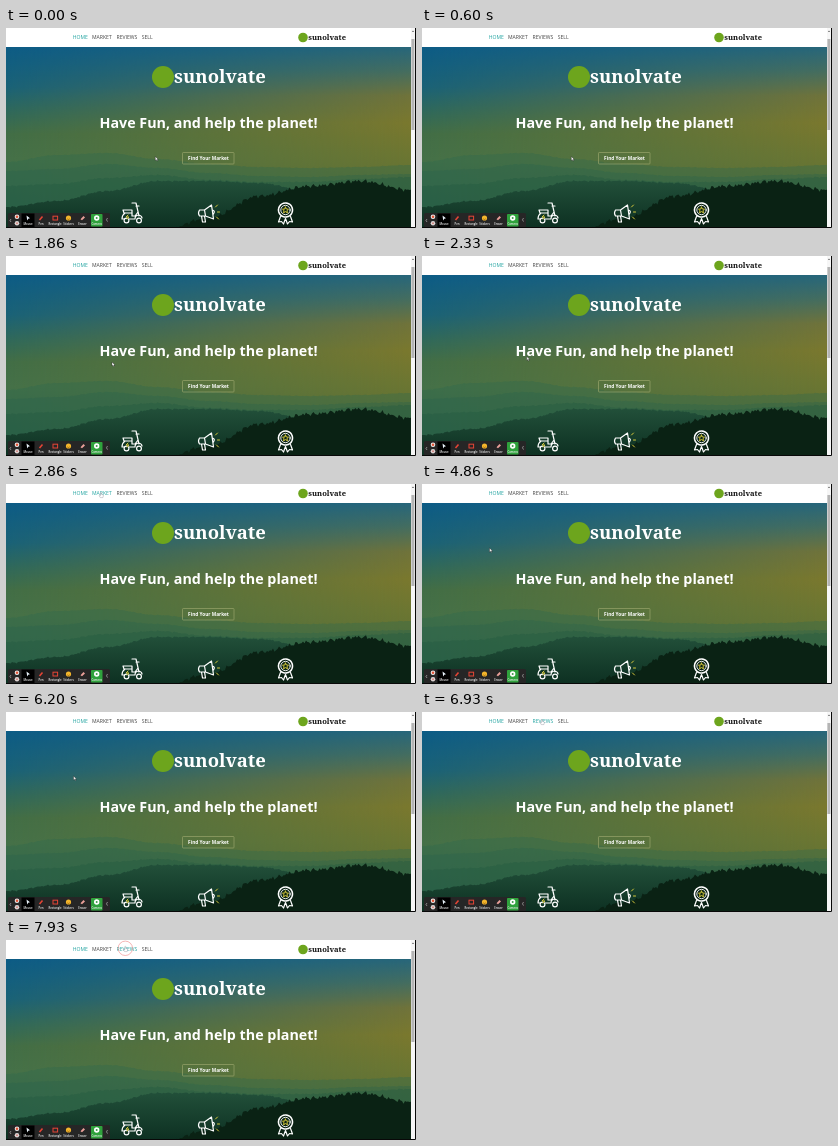
Animation of 410 by 200 pixels, one loop 8000 ms. Source, as an HTML page:

```html
<!DOCTYPE html>
<html lang="en">
<head>
<meta charset="utf-8">
<title>Home page tour</title>
<style>
html, body { margin: 0; width: 100%; height: 100%; overflow: hidden; background: #fff; }
svg { display: block; width: 410px; height: 200px; }
text { font-family: "Open Sans", sans-serif; }
.nav text { font-size: 5.1px; fill: #444; }
.nav .on { fill: #20a3a0; }
.brand { font-family: "Noto Serif", serif; font-weight: 700; }
.bold { font-weight: 700; fill: #fff; }
.icons { fill: none; stroke: #fff; stroke-width: 1.2; stroke-linecap: round; stroke-linejoin: round; }
.icons .accent { stroke: #d6c93c; stroke-width: 1; }
.tools text { font-size: 2.8px; font-weight: 600; fill: #eee; text-anchor: middle; }
</style>
</head>
<body>
<svg viewBox="0 0 410 200">
  <defs>
    <linearGradient id="west" x1="0" y1="0" x2="0" y2="1">
      <stop offset="0" stop-color="#0d5c86"/>
      <stop offset=".22" stop-color="#1a6277"/>
      <stop offset=".36" stop-color="#30695a"/>
      <stop offset=".48" stop-color="#426e46"/>
      <stop offset=".62" stop-color="#457148"/>
      <stop offset="1" stop-color="#356447"/>
    </linearGradient>
    <linearGradient id="east" x1="0" y1="0" x2="0" y2="1">
      <stop offset="0" stop-color="#27667a"/>
      <stop offset=".13" stop-color="#446d60"/>
      <stop offset=".27" stop-color="#70733a"/>
      <stop offset=".42" stop-color="#7a782e"/>
      <stop offset=".6" stop-color="#6c7632"/>
      <stop offset="1" stop-color="#526b36"/>
    </linearGradient>
    <linearGradient id="across">
      <stop offset="0" stop-color="#000"/>
      <stop offset="1" stop-color="#fff"/>
    </linearGradient>
    <mask id="fade" maskUnits="userSpaceOnUse" x="0" y="19" width="405" height="181">
      <rect y="19" width="405" height="181" fill="url(#across)"/>
    </mask>
    <linearGradient id="slope" x1="0" y1="0" x2="0" y2="1">
      <stop offset="0" stop-color="#22503a"/>
      <stop offset="1" stop-color="#0d3022"/>
    </linearGradient>
  </defs>

  <rect width="410" height="200" fill="#fff"/>
  <rect y="19" width="405" height="181" fill="url(#west)"/>
  <rect y="19" width="405" height="181" fill="url(#east)" mask="url(#fade)"/>
  <g id="hills"></g>

  <g class="nav" id="nav"></g>
  <circle cx="297" cy="9.5" r="4.8" fill="#6da51d"/>
  <text class="brand" x="302.3" y="12" font-size="7.6" fill="#111">sunolvate</text>

  <circle cx="157" cy="49" r="11" fill="#6da51d"/>
  <text class="brand" x="168" y="54.5" font-size="18.5" fill="#fff">sunolvate</text>
  <text class="bold" x="202.5" y="100" font-size="14.3" text-anchor="middle">Have Fun, and help the planet!</text>
  <rect x="176.5" y="124.5" width="51.5" height="11.5" rx=".8" fill="none" stroke="#a3ad72" stroke-width=".6"/>
  <text class="bold" x="202.5" y="132" font-size="4.75" text-anchor="middle">Find Your Market</text>

  <g class="icons">
    <g transform="translate(125 185)">
      <path d="M1-10H5L8 3M5-7H8M-8-3H1V0H-7ZM-6 0Q-9 2-9 6H-7M-2 6H4Q4 2 8 2Q11 3 11 5M1 0V3H4L7-1"/>
      <circle cx="-4.5" cy="7.5" r="2.4"/><circle cx="8" cy="7.5" r="2.4"/>
      <path class="accent" d="M-3 2L-5 4H-2L-4 6"/>
    </g>
    <g transform="translate(201.5 185)">
      <path d="M-8-3H-3L4-8L6 6L-2 3H-8Q-10 0-8-3ZM-3-3L-2 3M-6 3L-5 9H-2L-3 3M5-3Q8-2 6 1"/>
      <path class="accent" d="M8-6L10-8M10-1H12M9 4L11 6"/>
    </g>
    <g transform="translate(279.5 185)">
      <circle cy="-3" r="7" stroke-width="1.6" stroke-dasharray="2.6 .8"/>
      <circle cy="-3" r="4.7" stroke-width=".9"/>
      <path d="M-5 3.5L-7 9L-4 8.5L-2 11L0 5.5L2 11L4 8.5L7 9L5 3.5"/>
      <path class="accent" d="M0-6L.9-4L3-3.8L1.4-2.3L2-.2L0-1.4L-2-.2L-1.4-2.3L-3-3.8L-.9-4Z"/>
    </g>
  </g>

  <g class="tools">
    <rect x="2" y="185" width="102" height="14.3" rx="1.5" fill="#262626"/>
    <path d="M5 191L4 192.5L5 194M101.5 190L100.5 191.8L101.5 193.6" fill="none" stroke="#ccc" stroke-width=".6"/>
    <circle cx="11" cy="188.7" r="2.3" fill="#eee"/><circle cx="11" cy="188.7" r="1.3" fill="#e25335"/>
    <circle cx="11" cy="195.3" r="2.3" fill="#ddd"/><path d="M10 194.3L12 196.3M12 194.3L10 196.3" stroke="#d0453a" stroke-width=".6"/>
    <rect x="15.5" y="185.5" width="13" height="13.5" fill="#000"/>
    <rect x="85" y="186" width="11.5" height="12.5" rx=".8" fill="#2fa23c"/>
    <path d="M20.5 187.5L24 190.3L22.2 190.7L21.2 192.5Z" fill="#e8f2fa"/>
    <path d="M33.5 192L36.5 188.5" stroke="#e64536" stroke-width="1.6"/>
    <rect x="47" y="188.2" width="4.6" height="3.8" fill="none" stroke="#e64536" stroke-width="1"/>
    <circle cx="62.5" cy="190" r="2.6" fill="#f4b62c"/>
    <path d="M61.2 190.8Q62.5 192.2 63.8 190.8" fill="none" stroke="#754000" stroke-width=".5"/>
    <path d="M74.5 191.2L77.5 188L79 189.5L76 192.2Z" fill="#eba09a"/>
    <circle cx="90.7" cy="190" r="2.7" fill="#fff"/><circle cx="90.7" cy="190" r="1" fill="#3d9a48"/>
    <g id="labels"></g>
  </g>

  <rect x="405" width="4" height="200" fill="#f6f6f6"/>
  <rect x="405.4" y="11" width="3" height="91" fill="#b4b4b4"/>
  <path d="M406 4L407 2.5L408 4Z" fill="#555"/>
  <path d="M0 199.5H409.5V0" fill="none" stroke="#080808"/>

  <circle id="ring" cx="119.3" cy="8.3" r="7.2" fill="none" stroke="#ee8584" stroke-width=".6"/>
  <path id="arrow" d="M0 0V4L1 3.2L1.7 4.6L2.4 4.2L1.8 2.9H3Z" fill="#fff" stroke="#222" stroke-width=".4"/>
  <path id="hand" d="M-.5-2.4Q0-3 .5-2.4V-.6L2-.2Q2.6 0 2.4.8L1.9 2.6H-.7L-2 .7Q-1.7.1-.5.7Z" fill="#fff" stroke="#667" stroke-width=".3"/>
</svg>
<script>
const $ = id => document.getElementById(id);
const LOOP = 8000, STEP = 66;

function add(parent, tag, attrs, text = "") {
  const el = document.createElementNS("http://www.w3.org/2000/svg", tag);
  for (const k in attrs) el.setAttribute(k, attrs[k]);
  el.textContent = text;
  return parent.appendChild(el);
}

// Smooth slopes between a few heights, roughened like a tree line.
function ridge(heights, rough, fill, opacity = 1) {
  const gap = 405 / (heights.length - 1);
  let d = "M0 200";
  for (let x = 0; x <= 405; x += 1.5) {
    const i = Math.min(Math.floor(x / gap), heights.length - 2);
    const u = (1 - Math.cos((x / gap - i) * Math.PI)) / 2;
    const y = heights[i] + (heights[i + 1] - heights[i]) * u
      + rough * (Math.sin(x * 1.9) + Math.sin(x * .73) + Math.sin(x * 3.1));
    d += `L${x} ${Math.min(y, 200).toFixed(1)}`;
  }
  add($("hills"), "path", { d: d + "L405 200Z", fill, opacity });
}
ridge([134, 127, 125, 131, 136, 139, 140, 139, 137], .2, "#2c694d", .35);
ridge([143, 141, 136, 140, 145, 148, 149, 147, 146], .2, "#28634a", .35);
ridge([158, 156, 150, 147, 152, 154, 154, 151, 149], .3, "#215740", .4);
ridge([179, 173, 163, 153, 153, 155, 163, 172, 180], .35, "url(#slope)");
ridge([212, 210, 208, 204, 190, 168, 158, 153, 162], .9, "#0a2214");

const links = [["HOME", 66.7, 82], ["MARKET", 86, 106], ["REVIEWS", 110.5, 131.5], ["SELL", 135.7, 147]]
  .map(([name, left, right]) => ({ left, right, el: add($("nav"), "text", { x: left, y: 11.3 }, name) }));

["Mouse", "Pen", "Rectangle", "Stickers", "Eraser", "Camera"].forEach((name, i) =>
  add($("labels"), "text", { x: [22, 35, 49, 62.5, 76.5, 90.7][i], y: 196.7 }, name));

// Pointer moves: start, end, x, y
const moves = [
  [0, 0, 149.3, 128.5],
  [1000, 1400, 106, 106],
  [1860, 2000, 105, 103],
  [2200, 2860, 95, 11],
  [4400, 4860, 67.5, 64],
  [6200, 6930, 120, 10],
  [7130, 7200, 119.5, 9.5],
  [7460, 7660, 119.3, 9]
];

function pointer(t) {
  let [, , x, y] = moves[0];
  for (const [start, end, tx, ty] of moves) {
    if (t < start) break;
    const held = Math.floor((t - start) / STEP) * STEP;
    const p = t >= end ? 1 : held / (end - start);
    const e = p * p * (3 - 2 * p);
    x += (tx - x) * e;
    y += (ty - y) * e;
  }
  return [x, y];
}

function draw(now) {
  const t = now % LOOP;
  const [x, y] = pointer(t);
  let over = false;
  links.forEach((link, i) => {
    const hit = y < 16 && x >= link.left && x <= link.right;
    over = over || hit;
    link.el.setAttribute("class", hit || i === 0 ? "on" : "");
  });
  for (const id of ["arrow", "hand"]) {
    $(id).setAttribute("transform", `translate(${x} ${y})`);
    $(id).style.display = (id === "hand") === over ? "" : "none";
  }
  $("ring").style.display = t >= 7930 ? "" : "none";
}

const begin = performance.now();
function tick() {
  draw(performance.now() - begin);
  requestAnimationFrame(tick);
}
tick();
</script>
</body>
</html>
```
